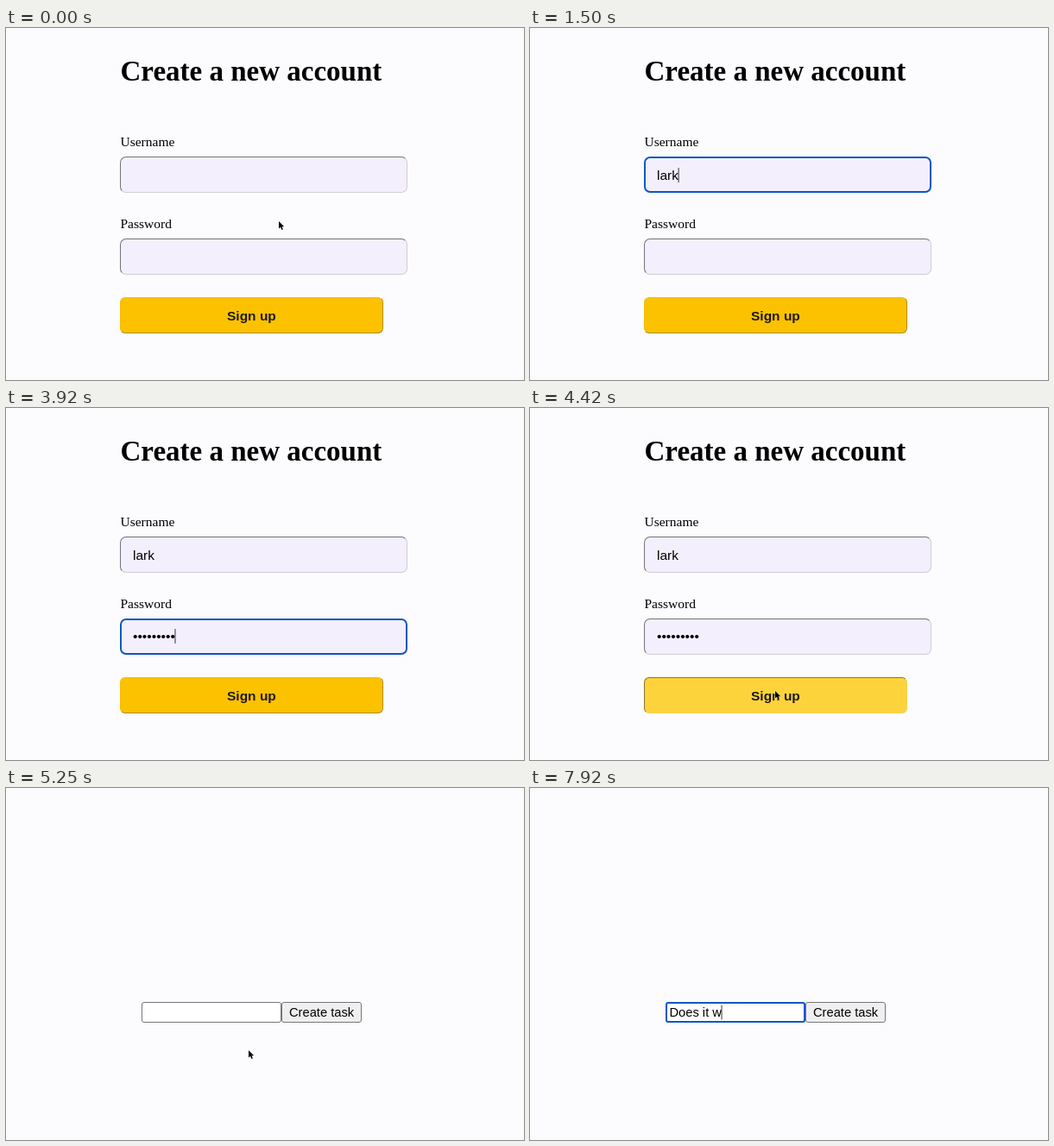
Recreate the animation shown at these times as an HTML page. Size 600 px wide and 408 px high, loop 8 s.

```html
<!DOCTYPE html>
<html lang="en">
<head>
<meta charset="utf-8">
<title>Sign up and create a task</title>
<style>
  html, body { margin: 0; width: 100%; height: 100%; overflow: hidden; background: #fcfbfe; }
  div, svg { position: absolute; box-sizing: border-box; }
  svg { left: 0; top: 0; }
  text { white-space: pre; font: 15.5px "Liberation Sans", Arial, sans-serif; }
  .serif { font-family: "Liberation Serif", "Times New Roman", serif; }
  .field {
    left: 132px; width: 333px; height: 42px; border-radius: 7px;
    background: #f4effc; border: 1px solid; border-color: #747378 #cfccd4 #cfccd4 #747378;
  }
  #submit {
    left: 132px; top: 312px; width: 305px; height: 42px; border-radius: 6px;
    background: #fcc200; border: 1px solid; border-color: #f3bd0c #b18c1c #b18c1c #f3bd0c;
  }
  #submit.hover { background: #fdd33c; }
  #submit.pressed { border-color: #8a762f #f3d060 #f3d060 #8a762f; }
  #task { left: 157px; top: 248px; width: 162px; height: 24px; border-radius: 3px; background: #fff; border: 1px solid #767578; }
  #create { left: 319px; top: 248px; width: 93px; height: 24px; border-radius: 3px; background: #efeff0; border: 1px solid #767578; }
  .focus { border: 2px solid #0b57c4 !important; }
  [hidden] { display: none; }
  #todo text { font-size: 14.7px; }
</style>
</head>
<body>
<div id="signup">
  <div class="field" id="user" style="top:149px"></div>
  <div class="field" id="pass" style="top:244px"></div>
  <div id="submit"></div>
  <svg width="600" height="408">
    <text class="serif" x="132.5" y="61" style="font-size:33px;font-weight:bold">Create a new account</text>
    <text class="serif" x="132.5" y="136.5">Username</text>
    <text class="serif" x="132.5" y="231.5">Password</text>
    <text id="userText" x="147" y="175.5"></text>
    <text id="passText" x="147" y="270"></text>
    <text x="256" y="338.5" style="font-weight:bold" fill="#1b1a14">Sign up</text>
  </svg>
</div>
<div id="todo">
  <div id="task"></div>
  <div id="create"></div>
  <svg width="600" height="408">
    <text id="taskText" x="161.5" y="265"></text>
    <text x="328" y="265">Create task</text>
  </svg>
</div>
<svg width="600" height="408">
  <rect id="caret" width="1" height="17" fill="#333"/>
  <g id="pointer">
    <path id="arrow" d="M0 0V8.6L2 6.8 3.4 10 4.9 9.3 3.5 6.2H6.2Z" stroke="#fff" stroke-width=".7" paint-order="stroke"/>
    <path id="beam" d="M-2.5-4.5Q0-4.5 0-3Q0-4.5 2.5-4.5M0-3V3M-2.5 4.5Q0 4.5 0 3Q0 4.5 2.5 4.5M-1 1.5H1" fill="none" stroke="#333"/>
  </g>
</svg>
<script>
const FPS = 12, LOOP = 8000;
const $ = id => document.getElementById(id);

// Each field: text, tick at which each character appears, focus span, caret top
const inputs = [
  { id: "user", text: "lark", keys: [11, 12, 14, 15], from: 8, to: 25, top: 162 },
  { id: "pass", text: "•".repeat(9), keys: [27, 28, 29, 31, 33, 36, 40, 43, 46], from: 25, to: 52, top: 256 },
  { id: "task", text: "Does it w", keys: [78, 80, 82, 83, 85, 87, 89, 93, 95], from: 69, to: 96, top: 251.5 },
];
// Pointer path: tick, x, y
const path = [
  [0, 316, 224], [1, 316, 224], [7, 318, 172], [19, 318, 172], [24, 312, 266],
  [47, 300, 266], [51, 284, 328], [62, 284, 328], [63, 281, 304], [67, 288, 262], [96, 288, 262],
];

function pointerAt(tick) {
  const i = path.findIndex(p => p[0] > tick);
  const [a, x0, y0] = path[i - 1], [b, x1, y1] = path[i];
  const u = (tick - a) / (b - a), s = u * u * (3 - 2 * u);
  return [x0 + (x1 - x0) * s, y0 + (y1 - y0) * s];
}

function draw(ms) {
  const tick = Math.min(95, Math.floor(ms * FPS / 1000 + 0.1));
  const onTodo = tick >= 57;
  $("signup").hidden = onTodo;
  $("todo").hidden = !onTodo;

  let caretShown = false;
  for (const { id, text, keys, from, to, top } of inputs) {
    const label = $(id + "Text"), focused = tick >= from && tick < to;
    label.textContent = text.slice(0, keys.filter(k => k <= tick).length);
    $(id).classList.toggle("focus", focused);
    if (focused) {
      caretShown = tick < 75 || tick >= 78;
      $("caret").setAttribute("x", +label.getAttribute("x") + label.getComputedTextLength() - 0.4);
      $("caret").setAttribute("y", top);
    }
  }
  $("caret").style.display = caretShown ? "" : "none";

  const [x, y] = pointerAt(tick);
  const moving = tick < 11 || (tick >= 19 && tick < 27) || (tick >= 48 && tick < 78);
  const overField = onTodo ? y > 248 && y < 272 : (y > 149 && y < 191) || (y > 244 && y < 286);
  $("pointer").style.display = moving ? "" : "none";
  $("pointer").setAttribute("transform", `translate(${x} ${y})`);
  $("arrow").style.display = overField ? "none" : "";
  $("beam").style.display = overField ? "" : "none";
  $("submit").classList.toggle("hover", moving && y > 312);
  $("submit").classList.toggle("pressed", tick >= 52 && tick < 55);
}

const start = performance.now();
function frame() {
  draw((performance.now() - start) % LOOP);
  requestAnimationFrame(frame);
}
frame();
</script>
</body>
</html>
```
